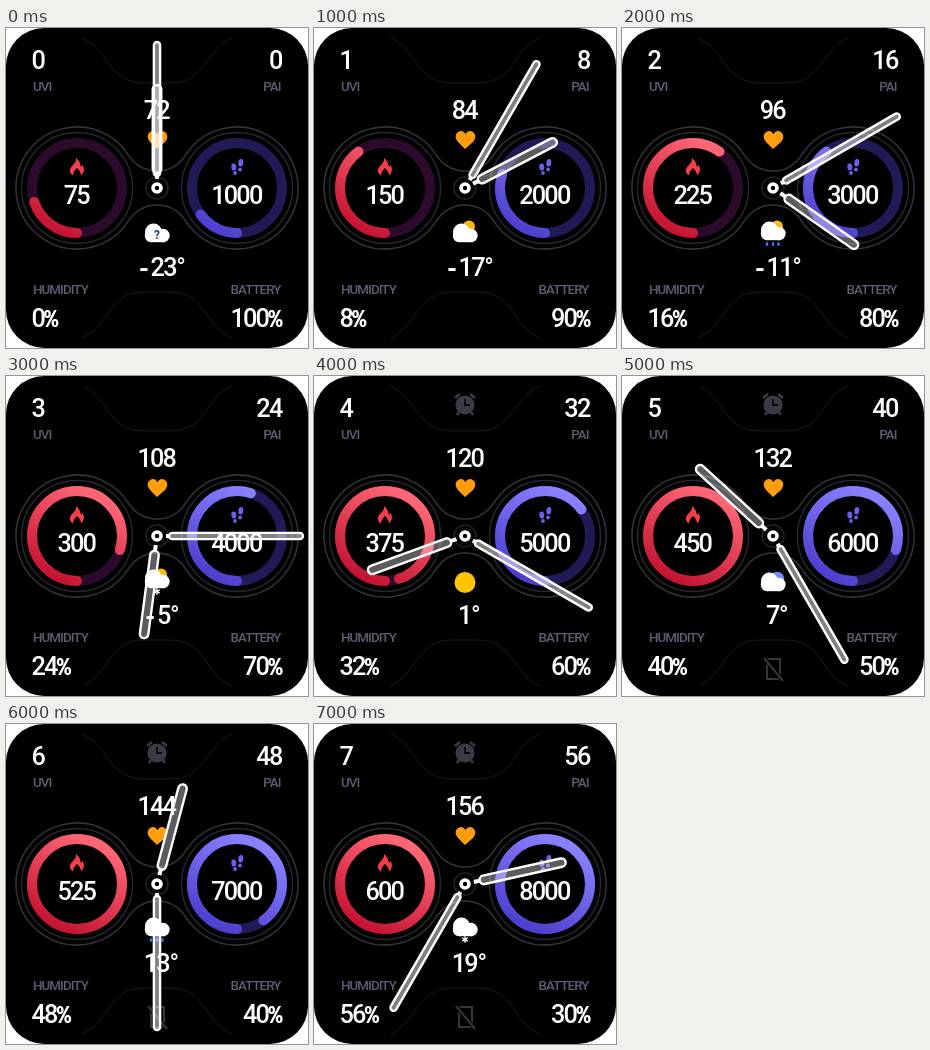
An HTML page with a canvas for the animation above (8 s loop, 302x320 px).

```html
<!DOCTYPE html>
<html lang="en">
<head>
<meta charset="utf-8">
<title>Watch face</title>
<style>
  html, body { margin: 0; width: 100%; height: 100%; overflow: hidden; background: #fff; }
  canvas { display: block; width: 302px; height: 320px; }
</style>
</head>
<body>
<canvas id="face" width="302" height="320"></canvas>
<script>
const ctx = document.getElementById('face').getContext('2d');
const TAU = Math.PI * 2;
const rad = deg => deg * Math.PI / 180;
const CX = 151, CY = 160;

function disc(x, y, r, color) {
  ctx.fillStyle = color;
  ctx.beginPath();
  ctx.arc(x, y, r, 0, TAU);
  ctx.fill();
}

function ring(x, y, r, color, width) {
  ctx.strokeStyle = color;
  ctx.lineWidth = width;
  ctx.beginPath();
  ctx.arc(x, y, r, 0, TAU);
  ctx.stroke();
}

function fillPath(d, color) {
  ctx.fillStyle = color;
  ctx.fill(new Path2D(d));
}

function strokePath(d, color, width) {
  ctx.strokeStyle = color;
  ctx.lineWidth = width;
  ctx.stroke(new Path2D(d));
}

function oval(x, y, rx, ry, turn, color) {
  ctx.fillStyle = color;
  ctx.beginPath();
  ctx.ellipse(x, y, rx, ry, turn, 0, TAU);
  ctx.fill();
}

function setFont(font, spacing) {
  ctx.font = font;
  ctx.letterSpacing = spacing + 'px';
}

// Signs use a monospaced face, whose minus and percent suit the narrow digits.
function valueFont(run) {
  if (/[-%]/.test(run)) setFont('600 24px "Noto Sans Mono", monospace', -0.6);
  else setFont('500 25.3px Roboto, sans-serif', -1.8);
}

// Draws a mixed run of digits and signs; returns its right edge.
function value(text, x, y, align) {
  const runs = String(text).match(/[-%]|[^-%]+/g);
  const widths = runs.map(run => {
    valueFont(run);
    return ctx.measureText(run).width;
  });
  const total = widths.reduce((a, b) => a + b, 0);
  if (align === 'center') x -= total / 2 + 0.7;
  if (align === 'right') x -= total;
  ctx.textAlign = 'left';
  ctx.fillStyle = '#fff';
  runs.forEach((run, i) => {
    valueFont(run);
    ctx.fillText(run, x, y);
    x += widths[i];
  });
  return x;
}

function label(text, x, y, align) {
  setFont('500 13.3px Roboto, sans-serif', -0.9);
  ctx.textAlign = align;
  ctx.fillStyle = '#5d5d72';
  ctx.fillText(text, x, y);
}

function outlines() {
  const neck = 33.7, lift = 50.7, a = Math.atan2(lift, 80);
  ctx.strokeStyle = '#32343b';
  ctx.lineWidth = 1.5;
  ctx.beginPath();
  ctx.arc(71, CY, 61, a, TAU - a);
  ctx.arc(CX, CY - lift, neck, Math.PI - a, a, true);
  ctx.arc(231, CY, 61, Math.PI + a, Math.PI - a);
  ctx.arc(CX, CY + lift, neck, -a, Math.PI + a, true);
  ctx.closePath();
  ctx.stroke();
  ring(71, CY, 55.5, '#25272d', 1.5);
  ring(231, CY, 55.5, '#25272d', 1.5);
  strokePath('M76 10C103 20 101 55 138 55H164C201 55 199 20 226 10', '#1b1b1f', 1);
  strokePath('M76 310C103 300 101 264 138 264H164C201 264 199 300 226 310', '#1b1b1f', 1);
}

// A gauge fills in twenty equal segments.
function gauge(x, progress, track, dark, light) {
  const level = 1 + Math.floor(Math.min(progress, 1) * 19);
  ring(x, CY, 45, track, 10);
  const shade = ctx.createLinearGradient(x - 25, CY + 45, x + 20, CY - 40);
  shade.addColorStop(0, dark);
  shade.addColorStop(1, light);
  ctx.strokeStyle = shade;
  ctx.lineWidth = 10;
  ctx.lineCap = 'round';
  ctx.beginPath();
  ctx.arc(x, CY, 45, Math.PI / 2, Math.PI / 2 + TAU * level / 20);
  ctx.stroke();
  ctx.lineCap = 'butt';
}

function flame() {
  fillPath('M70 130C75 134 74 138 75.5 139L76.5 136.5C79 141 78 145 75 147.5C75 144 73 142 71 140C69 142 67 144 67 147.5C63 145 63 141 66.5 137.5C69 135 70.5 133 70 130Z', '#f63d48');
}

function footprints() {
  const color = '#6c60eb';
  oval(227.8, 139, 2.5, 3.6, -0.1, color);
  oval(229, 145, 1.9, 1.9, 0, color);
  oval(234.8, 134.8, 2.5, 3.8, 0.1, color);
  oval(234, 141.5, 1.9, 2, 0, color);
}

function alarm() {
  const color = '#3b3b46';
  disc(151, 29, 9.6, color);
  strokePath('M141 22L146 18M156 18L161 22M145 36L143 39M157 36L159 39', color, 2.6);
  strokePath('M151 23V29H156', '#0b0b0d', 1.8);
}

function phoneOff() {
  strokePath('M145 283H158V303H145Z', '#36363f', 2);
  strokePath('M142 282L161 305', '#000', 4);
  strokePath('M142 282L161 305', '#36363f', 2);
}

function cloud(dy) {
  const color = '#fff';
  disc(147.5, 204 + dy, 8.5, color);
  disc(157, 207.5 + dy, 6.7, color);
  fillPath(`M145 ${206 + dy}H159V${214.2 + dy}H145Z`, color);
  disc(145, 208 + dy, 6.2, color);
}

function drops() {
  [145, 151, 156.5].forEach(x => oval(x, 216, 1.3, 2, 0, '#2e7cff'));
}

function flake() {
  for (let i = 0; i < 3; i++) {
    const a = Math.PI / 2 + i * Math.PI / 3;
    const dx = 3.2 * Math.cos(a), dy = 3.2 * Math.sin(a);
    strokePath(`M${151 - dx} ${215.5 - dy}L${151 + dx} ${215.5 + dy}`, '#fff', 1.4);
  }
}

const sunBehind = () => disc(155, 198.5, 6, '#ffb90c');
const weather = [
  () => {
    cloud(0);
    setFont('700 12px Roboto, sans-serif', 0);
    ctx.textAlign = 'center';
    ctx.fillStyle = '#24416e';
    ctx.fillText('?', 151, 211);
  },
  () => { sunBehind(); cloud(0); },
  () => { sunBehind(); cloud(-2); drops(); },
  () => { sunBehind(); cloud(-2); flake(); },
  () => disc(151, 206.5, 10.5, '#ffc400'),
  () => { disc(155, 203, 7.3, '#6f8dff'); cloud(1); },
  () => { cloud(-2); drops(); },
  () => { cloud(-2); flake(); }
];

function hand(degrees, start, length, width, fill) {
  ctx.save();
  ctx.translate(CX, CY);
  ctx.rotate(rad(degrees));
  ctx.fillStyle = '#fff';
  ctx.fillRect(-2, -start - 1, 4, start - 8);
  ctx.beginPath();
  ctx.roundRect(-width / 2, -length + 1, width, length - start - 1, width / 2);
  ctx.fillStyle = fill;
  ctx.fill();
  ctx.strokeStyle = '#fff';
  ctx.lineWidth = 2.4;
  ctx.stroke();
  ctx.restore();
}

function draw(step) {
  const n = step + 1;
  ctx.clearRect(0, 0, 302, 320);
  ctx.fillStyle = '#000';
  ctx.beginPath();
  ctx.roundRect(0, 0, 302, 320, 38);
  ctx.fill();

  const calories = 75 * n, steps = 1000 * n;
  outlines();
  gauge(71, calories / 378, '#2b0a2b', '#c3102f', '#ff6675');
  gauge(231, steps / 7500, '#201b56', '#4b3dcc', '#8980ff');
  flame();
  footprints();

  label('UVI', 27, 63, 'left');
  label('PAI', 274.5, 63, 'right');
  label('HUMIDITY', 27, 266, 'left');
  label('BATTERY', 274.5, 266, 'right');

  value(step, 25.5, 41, 'left');
  value(step * 8, 275.5, 41, 'right');
  value(step * 8 + '%', 25.5, 299, 'left');
  value(100 - step * 10 + '%', 276, 299, 'right');
  value(72 + step * 12, CX, 91, 'center');
  value(calories, 71, 176, 'center');
  value(steps, 231, 176, 'center');
  const edge = value(step * 6 - 23, CX, 248, 'center');
  value('°', edge + 0.5, 248, 'left');

  fillPath('M151 121L144 114C139 108 143 103 147 103C149 103 150 104 151.5 106C153 104 154 103 156 103C160 103 164 108 159 114Z', '#ff9d0c');
  weather[step]();
  if (step >= 4) alarm();
  if (step >= 5) phoneOff();

  ring(CX, CY, 11, '#202329', 1.5);
  hand(step * 62.5, 15, 104, 8.5, 'rgba(255,255,255,.36)');
  hand(step * 30, 12, 147, 6.2, 'rgba(255,255,255,.5)');
  disc(CX, CY, 9, '#000');
  disc(CX, CY, 5.8, '#fff');
  disc(CX, CY, 2.2, '#000');
}

const began = performance.now();
function tick() {
  draw(Math.floor((performance.now() - began) % 8000 / 1000));
  requestAnimationFrame(tick);
}
tick();
</script>
</body>
</html>
```
